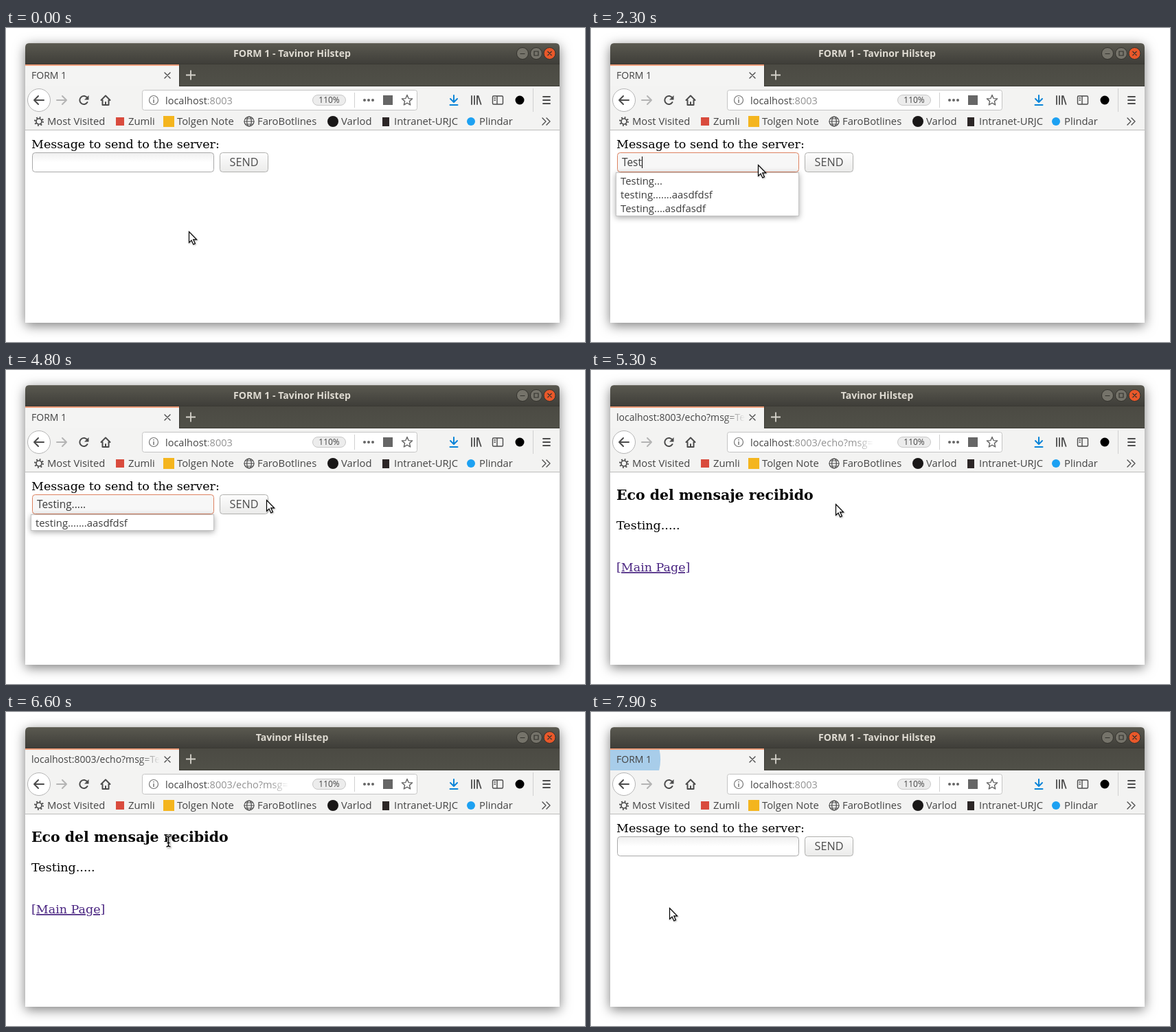
An HTML page for the animation above (8000 ms loop, 843x457 px).

```html
<!DOCTYPE html>
<html lang="en">
<head>
<meta charset="utf-8">
<title>Form demo</title>
<style>
  html, body { margin: 0; width: 100%; height: 100%; overflow: hidden; background: #fff; }
  .window { position: absolute; left: 28px; top: 22px; width: 778px; height: 407px;
    border-radius: 6px 6px 0 0; box-shadow: 0 4px 17px rgba(0, 0, 0, .52); }
  svg { position: absolute; left: 0; top: 0; display: block; }
  text { font: 14.8px "Open Sans", "Noto Sans", sans-serif; fill: #444; white-space: pre; }
  .title { font-size: 14.1px; font-weight: 700; fill: #dfdbd2; text-anchor: middle; }
  .tab { font-size: 14px; }
  .url { font-size: 14.5px; }
  .zoom { font-size: 12px; text-anchor: middle; }
  .dim { fill: #929292; }
  .page text { font: 17.5px "DejaVu Serif", serif; fill: #000; }
  .page .head { font-size: 20.45px; font-weight: 700; }
  .page .link { fill: #4b2682; text-decoration: underline 1px; text-decoration-skip-ink: none; }
  .page .field { font: 15.4px "Open Sans", "Noto Sans", sans-serif; fill: #3c3c3c; }
  .page .send { font: 16.2px "Open Sans", "Noto Sans", sans-serif; fill: #4c4c4c; text-anchor: middle; }
  .page .drop text { font: 14.9px "Open Sans", "Noto Sans", sans-serif; fill: #3c3c3c; }
  .line { fill: none; stroke: #4c4c4c; stroke-width: 2; stroke-linecap: round; stroke-linejoin: round; }
  .thin { stroke-width: 1.4; }
  .pale { stroke: #b4b4b4; }
  .blue { stroke: #0a84d8; }
  .shade { filter: drop-shadow(0 2px 4px rgba(0, 0, 0, .35)); }
  .cursor { filter: drop-shadow(1px 1px 1px rgba(0, 0, 0, .3)); }
</style>
</head>
<body>
<div class="window"></div>
<svg width="843" height="457" viewBox="0 0 843 457">
  <defs>
    <linearGradient id="bar" x2="0" y2="1"><stop stop-color="#5a5950"/><stop offset="1" stop-color="#3f3e39"/></linearGradient>
    <linearGradient id="strip" x2="0" y2="1"><stop stop-color="#4b4a43"/><stop offset="1" stop-color="#505048"/></linearGradient>
    <linearGradient id="face" x2="0" y2="1"><stop stop-color="#fdfdfd"/><stop offset="1" stop-color="#ebebea"/></linearGradient>
    <linearGradient id="well" x2="0" y2="1"><stop stop-color="#efefef"/><stop offset=".5" stop-color="#fff"/></linearGradient>
    <linearGradient id="fade"><stop stop-color="#fff"/><stop offset="1" stop-color="#fff" stop-opacity="0"/></linearGradient>
    <mask id="labelMask" maskUnits="userSpaceOnUse" x="28" y="55" width="196" height="30">
      <path d="M28 55h166v30H28z" fill="#fff"/><rect x="194" y="55" width="30" height="30" fill="url(#fade)"/></mask>
    <mask id="urlMask" maskUnits="userSpaceOnUse" x="228" y="92" width="184" height="26">
      <path d="M228 92h158v26H228z" fill="#fff"/><rect x="386" y="92" width="26" height="26" fill="url(#fade)"/></mask>
    <clipPath id="tabClip"><rect x="28" y="55" width="224" height="30"/></clipPath>
  </defs>

  <!-- title bar -->
  <path d="M28 52V28q0-6 6-6h766q6 0 6 6v24z" fill="url(#bar)"/>
  <path d="M33 22.5h768" stroke="#6d6b62"/>
  <text class="title" id="title" x="416.5" y="42"></text>
  <g stroke="#33322d" fill="#75736a">
    <circle cx="752" cy="37" r="8.5"/><circle cx="772" cy="37" r="8.5"/>
    <circle cx="791.5" cy="37" r="8.5" fill="#e9582a"/>
    <path d="M748.5 37.5h7M769 34h6v6h-6zM788.5 34l6 6m0-6l-6 6" fill="none" stroke-width="1.2"/>
  </g>

  <!-- tab strip -->
  <rect x="28" y="52" width="778" height="33" fill="url(#strip)"/>
  <path d="M28 52.5h778M252 84.5h554M252.5 53v32" stroke="#3a3934"/>
  <rect x="28" y="53" width="224" height="32" fill="#f4f4f3"/>
  <rect x="28" y="53" width="224" height="2" fill="#ee9c78"/>
  <g clip-path="url(#tabClip)"><circle id="burst" cx="37" cy="69" fill="#62aae1"/></g>
  <g mask="url(#labelMask)"><text class="tab" id="tab" x="37" y="74"></text></g>
  <path class="line thin" d="M231 65l8 8m0-8l-8 8"/>
  <path d="M262 68.5h14m-7-7v14" stroke="#d6d3cb" stroke-width="1.8"/>

  <!-- toolbars -->
  <rect x="28" y="85" width="778" height="64" fill="#f3f3f2"/>
  <path d="M28 148.5h778" stroke="#bcbcbb"/>
  <circle cx="48" cy="105" r="16.5" fill="#fff" stroke="#b5b5b5"/>
  <path class="line" d="M55 105H41m6-6l-6 6 6 6"/>
  <path class="line pale" d="M74 105h14m-6-6l6 6-6 6"/>
  <path class="line" d="M118.5 108a6 6 0 1 1 0-6"/>
  <path d="M120.5 98v6.5h-6.5z" fill="#4c4c4c"/>
  <path class="line" d="M138.5 105l6.5-6.5 6.5 6.5M140.5 105v7h9v-7M145 112v-4"/>
  <rect x="198.5" y="90.5" width="400" height="29" rx="3" fill="#fff" stroke="#c4c4c4"/>
  <circle cx="215" cy="105" r="6.5" fill="none" stroke="#777" stroke-width="1.2"/>
  <path d="M215 104v5m0-8v1.6" stroke="#777" stroke-width="1.5"/>
  <g mask="url(#urlMask)"><text class="url" x="232" y="110.5">localhost<tspan class="dim" id="path"></tspan></text></g>
  <rect x="446.5" y="97.5" width="48" height="15" rx="7.5" fill="#ececec" stroke="#c8c8c8"/>
  <text class="zoom" x="470.5" y="109.3">110%</text>
  <path d="M507.5 94v22M767.5 88v34" stroke="#d0d0d0"/>
  <g fill="#666"><circle cx="522" cy="105" r="2"/><circle cx="528" cy="105" r="2"/><circle cx="534" cy="105" r="2"/>
    <rect x="549" y="98" width="14" height="14"/></g>
  <path class="line thin" id="star" style="stroke:#666"/>
  <path class="line blue" d="M652 98v10m-5-5l5 5 5-5M646.5 112h11"/>
  <path class="line" d="M678 99v12m4-12v12m4-12v12m1.5-12l4 12" style="stroke-width:1.8"/>
  <path class="line thin" d="M710 99h12q1.5 0 1.5 1.5v9q0 1.5-1.5 1.5h-12q-1.5 0-1.5-1.5v-9q0-1.5 1.5-1.5zM715 99v12M711 102h1.5m-1.5 3h1.5"/>
  <circle cx="748" cy="105" r="6.5"/>
  <path class="line" d="M782 100h10m-10 5h10m-10 5h10" style="stroke-width:1.8"/>

  <!-- bookmarks -->
  <circle class="line" cx="48" cy="136" r="4" style="stroke-width:1.7"/>
  <circle class="line" cx="48" cy="136" r="5.8" stroke-dasharray="1.8 2.755" style="stroke-linecap:butt;stroke-width:2.4"/>
  <rect x="160" y="130" width="12" height="12" fill="#d94b3d"/>
  <rect x="229" y="128" width="16" height="16" fill="#f4b51e"/>
  <g class="line" style="stroke-width:1.2"><circle cx="354" cy="136" r="7"/><ellipse cx="354" cy="136" rx="3.3" ry="7"/>
    <path d="M347 136h14M348.5 132h11m-11 8h11"/></g>
  <circle cx="476" cy="136" r="8" fill="#191717"/>
  <rect x="548" y="130" width="10" height="13" fill="#2c2626"/>
  <circle cx="677" cy="136" r="6" fill="#1da1f2"/>
  <g id="marks"></g>
  <path class="line thin" d="M781 131l5 5-5 5m6-10l5 5-5 5"/>

  <rect x="28" y="149" width="778" height="280" fill="#fff"/>

  <g class="page" id="form">
    <text x="37" y="175">Message to send to the server:</text>
    <rect id="box" x="38.5" y="181.5" width="264" height="28" rx="4"/>
    <text class="field" id="field" x="45" y="201"></text>
    <path id="caret" stroke="#000"/>
    <rect id="button" x="311.5" y="181.5" width="70" height="28" rx="4" fill="url(#face)"/>
    <text class="send" x="346.5" y="201">SEND</text>
    <g class="drop" id="drop">
      <rect class="shade" id="list" x="36.5" y="210.5" width="266" fill="#fff" stroke="#c4c4c4"/>
      <g id="long"><text x="43" y="228">Testing...</text><text x="43" y="248">testing.......aasdfdsf</text>
        <text x="43" y="268">Testing....asdfasdf</text></g>
      <text id="short" x="43" y="228">testing.......aasdfdsf</text>
    </g>
  </g>

  <g class="page" id="echo">
    <text class="head" x="37" y="189">Eco del mensaje recibido</text>
    <text x="37" y="232">Testing.....</text>
    <text class="link" x="37" y="293">[Main Page]</text>
  </g>

  <g id="status">
    <path id="panel" fill="#f3f3f2" stroke="#bcbcbb"/>
    <text id="note" x="33" y="424"></text>
  </g>

  <g class="cursor" id="cursor">
    <path id="arrow" d="M.5.5v15.8l3.6-3.4 2.7 6 2.6-1.2-2.7-5.8h4.9z" fill="#fff" stroke="#000" stroke-width="1.2"/>
    <g id="beam" fill="none"><path d="M-3-7.5q3 0 3 2v11q0 2-3 2M3-7.5q-3 0-3 2v11q0 2 3 2M-2 2h4" stroke="#fff" stroke-width="3.4"/>
      <path d="M-3-7.5q3 0 3 2v11q0 2-3 2M3-7.5q-3 0-3 2v11q0 2 3 2M-2 2h4" stroke="#000" stroke-width="1.5"/></g>
    <path id="hand" d="M-1.5 1q0-1.5 1.5-1.5t1.5 1.5v5.5l6 1.2q2 .5 2 2.5l-1 6v2.5h-8v-2l-4.5-5q-1-1.8.5-2.3l2 1.2z" fill="#fff" stroke="#000" stroke-width="1.2"/>
  </g>
</svg>
<script>
const LOOP = 8000, STEP = 100, BROWSER = 'Tavinor Hilstep', MESSAGE = 'Testing.....';
const $ = id => document.getElementById(id);
const show = (id, on) => $(id).setAttribute('visibility', on ? 'visible' : 'hidden');
const set = (id, values) => { for (const k in values) $(id).setAttribute(k, values[k]); };
const within = (t, a, b) => t >= a && t < b;

const keyTimes = [1600, 1800, 2000, 2300, 2500, 2600, 2700, 2900, 3100, 3200, 3300, 3500];
const bursts = [5418, 7846];
// time, x, y of the pointer
const route = [
  [0, 266, 296], [200, 266, 296], [500, 280, 240], [700, 295, 202], [900, 295, 202],
  [1000, 268, 202], [1100, 245, 202], [1500, 245, 202], [1600, 243, 199], [4200, 243, 199],
  [4300, 400, 190], [4400, 543, 236], [4500, 543, 236], [4600, 470, 212], [4700, 415, 194],
  [4800, 379, 189], [5000, 356, 195], [6000, 356, 195], [6100, 340, 218], [6300, 284, 263],
  [6500, 246, 222], [6600, 236.5, 188.5], [6900, 236.5, 188.5], [7200, 140, 268],
  [7400, 114, 285], [8000, 114, 285]
];

function pointer(t) {
  const i = route.findIndex(p => p[0] > t);
  const [t0, x0, y0] = route[i - 1], [t1, x1, y1] = route[i];
  const u = (t - t0) / (t1 - t0);
  return [x0 + (x1 - x0) * u, y0 + (y1 - y0) * u];
}

function draw(t) {
  const echo = within(t, 5300, 7700);
  show('form', !echo);
  show('echo', echo);
  $('title').textContent = echo ? BROWSER : 'FORM 1 - ' + BROWSER;
  $('tab').textContent = echo ? 'localhost:8003/echo?msg=Testing' : 'FORM 1';
  $('path').textContent = echo ? ':8003/echo?msg=Testing' : ':8003';

  const focus = within(t, 700, 5000), pressed = within(t, 5000, 5300);
  set('box', { stroke: focus ? '#dd8260' : '#a9a9a9', fill: focus ? '#f7f7f7' : 'url(#well)' });
  set('button', { stroke: pressed ? '#dd8260' : '#b0b0ae' });
  $('field').textContent = t < 5300 ? MESSAGE.slice(0, keyTimes.filter(k => k <= t).length) : '';
  const x = Math.round(45 + $('field').getComputedTextLength()) + .5;
  set('caret', { d: `M${x} 187v17` });
  show('caret', within(t, 700, 4600));

  const open = within(t, 1600, 5000), few = t >= 3600;
  show('drop', open);
  show('long', open && !few);
  show('short', open && few);
  set('list', { height: few ? 23 : 63 });

  const age = bursts.map(b => (t - b) / 375).find(a => a > 0 && a < 1);
  const grow = age ? 1 - (1 - age) ** 2 : 0;
  set('burst', { r: 240 * grow, opacity: .7 * (1 - grow) });

  const status = within(t, 7300, 7900);
  show('status', status);
  $('note').textContent = t < 7600 ? 'localhost:8003' : 'Transferring data from localhost…';
  if (status) {
    const w = $('note').getComputedTextLength() + 10;
    set('panel', { d: `M28 408.5h${w}v20h${-w}` });
  }

  const beam = within(t, 700, 1600) || within(t, 6600, 7000), hand = within(t, 7300, 7900);
  show('beam', beam);
  show('hand', hand);
  show('arrow', !beam && !hand);
  set('cursor', { transform: `translate(${pointer(t)})` });
}

$('marks').innerHTML = [[60, 'Most Visited'], [178, 'Zumli'], [249, 'Tolgen Note'], [366, 'FaroBotlines'],
  [488, 'Varlod'], [565, 'Intranet-URJC'], [689, 'Plindar']]
  .map(([x, name]) => `<text x="${x}" y="141">${name}</text>`).join('');

set('star', { d: 'M' + Array.from({ length: 10 }, (_, i) => {
  const r = i % 2 ? 3.6 : 8, a = i * Math.PI / 5;
  return [584 + r * Math.sin(a), 105.5 - r * Math.cos(a)].map(v => v.toFixed(1));
}).join('L') + 'z' });

const start = performance.now();
function tick() {
  const t = (performance.now() - start) % LOOP;
  draw(Math.floor(t / STEP) * STEP);
  requestAnimationFrame(tick);
}
tick();
</script>
</body>
</html>
```
